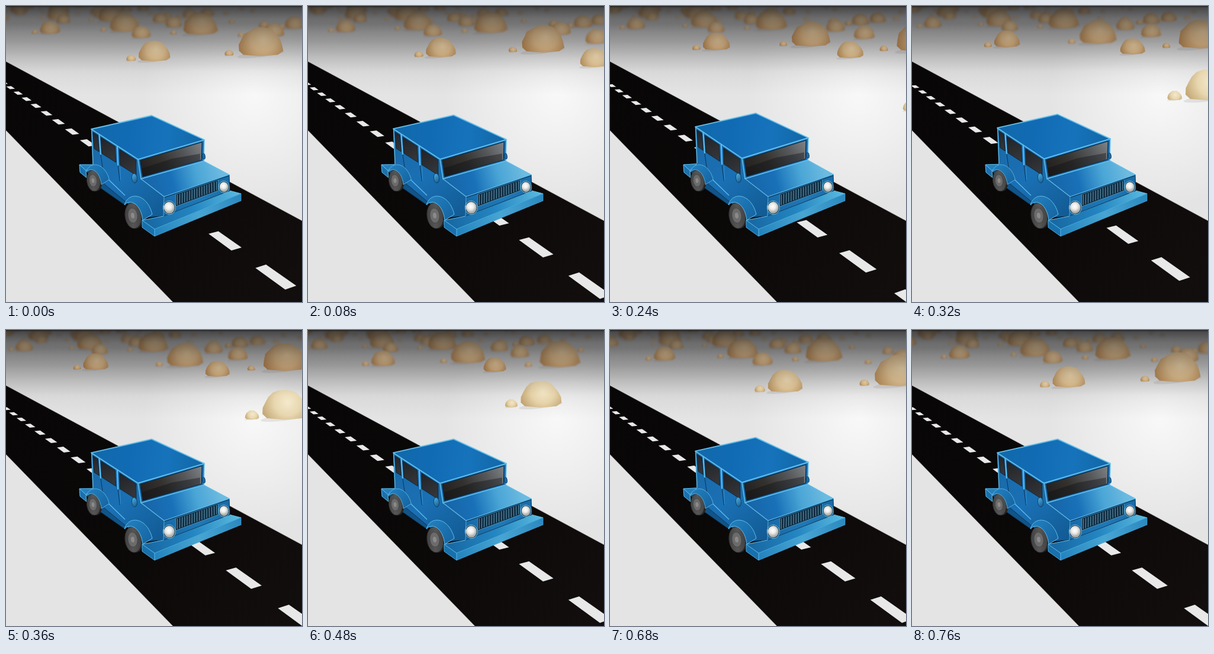
These frames come from a looping animation (500 px wide and 500 px high, 0.8 s). An HTML page with a canvas:

```html
<!DOCTYPE html>
<html lang="en">
<head>
<meta charset="utf-8">
<title>Desert drive</title>
<style>
html, body { margin: 0; width: 100%; height: 100%; overflow: hidden; background: #e4e4e4; }
canvas { display: block; width: 500px; height: 500px; }
</style>
</head>
<body>
<canvas id="stage" width="500" height="500"></canvas>
<script>
const ctx = document.getElementById('stage').getContext('2d');
const STEP = 40, STEPS = 20;
const VANISH = { x: -236, y: -36 };
const ROCK_PERIOD = 0.00448;
const DASH_GAP = 0.0002862;
const BLUE = '#176cb0', EDGE = '#62bfeb', DARK = '#0a365c';
const clamp = v => Math.min(1, Math.max(0, v));

function random(seed) {
  return () => {
    seed = (seed * 16807) % 2147483647;
    return seed / 2147483647;
  };
}

// Ground point: p = lateral position, q = distance (inverse screen height).
const ground = (p, q) => [VANISH.x + p / q, VANISH.y + 1 / q];

// Bilinear surface over four corners, clockwise from the top left.
const surface = (a, b, c, d) => (u, v) => [0, 1].map(k =>
  (a[k] * (1 - u) + b[k] * u) * (1 - v) + (d[k] * (1 - u) + c[k] * u) * v);
const patch = (s, u0, u1, v0, v1) => [s(u0, v0), s(u1, v0), s(u1, v1), s(u0, v1)];

function paint(fill, stroke, width = 1) {
  if (fill) { ctx.fillStyle = fill; ctx.fill(); }
  if (stroke) { ctx.strokeStyle = stroke; ctx.lineWidth = width; ctx.stroke(); }
}

function line(points, color, width) {
  ctx.beginPath();
  points.forEach(point => ctx.lineTo(...point));
  paint(null, color, width);
}

function poly(points, fill, stroke, width) {
  ctx.beginPath();
  points.forEach(point => ctx.lineTo(...point));
  ctx.closePath();
  paint(fill, stroke, width);
}

function oval(x, y, rx, ry, fill, stroke, width) {
  ctx.beginPath();
  ctx.ellipse(x, y, rx, ry, -0.12, 0, Math.PI * 2);
  paint(fill, stroke, width);
}

function addStops(gradient, colors) {
  colors.forEach((c, i) => gradient.addColorStop(i / (colors.length - 1), c));
  return gradient;
}
const linear = ([x0, y0], [x1, y1], ...colors) =>
  addStops(ctx.createLinearGradient(x0, y0, x1, y1), colors);
const radial = (x, y, r, ...colors) =>
  addStops(ctx.createRadialGradient(x, y, 0, x, y, r), colors);

function fillAll(style) {
  ctx.fillStyle = style;
  ctx.fillRect(0, 0, 500, 500);
}

// reach = distance from the vanishing point, slope = direction of the track
const makeRock = (reach, slope, size) => ({ p: 1 / slope, q: 1 / (slope * reach), size });

function scatterRocks() {
  const next = random(417);
  const rocks = [];
  const boulders = [
    [666, 0.177, 0.65], [486, 0.261, 0.43], [564, 0.145, 0.73], [688, 0.125, 0.42],
    [464, 0.19, 0.37], [519, 0.135, 0.4], [723, 0.1, 0.46]
  ];
  boulders.forEach(([reach, slope, size], i) => {
    rocks.push(makeRock(reach, slope, size));
    // the first few have a pebble beside them
    if (i < 4) rocks.push(makeRock(reach * 0.92, slope * 1.09, 0.13));
  });
  for (let i = 0; i < 8; i++) {
    rocks.push(makeRock(480 + 250 * next(), 0.06 + 0.05 * next(), 0.15 + 0.3 * next() ** 2));
  }
  return rocks;
}
const rocks = scatterRocks();

function drawRock({ x, y, w, seed }) {
  const h = w * 0.63;
  const jitter = random(seed * 911 + 37);
  const near = clamp((y - 75) / 65);
  const shade = (hue, sat, light) => `hsl(${hue + near * 8} ${sat}% ${light + near * 11}%)`;
  const points = [];
  for (let i = 0; i <= 12; i++) {
    const a = Math.PI * i / 12;
    const r = 0.95 + jitter() * 0.07;
    points.push([x - Math.cos(a) * w / 2 * r, y - h * 0.16 - Math.sin(a) * h * 0.84 * r]);
  }
  points.push([x + w * 0.38, y - h * 0.02], [x, y + h * 0.03], [x - w * 0.38, y - h * 0.02]);
  ctx.filter = `blur(${0.7 + 1.3 * clamp((70 - y) / 50)}px)`;
  oval(x, y - h * 0.04, w * 0.52, h * 0.1, 'rgba(110,95,80,.12)');
  poly(points, radial(x + w * 0.06, y - h * 0.56, w * 0.56,
    shade(36, 64, 77), shade(34, 55, 69), shade(31, 40, 51)));
  ctx.filter = 'none';
}

function drawRocks(step) {
  const visible = [];
  rocks.forEach((rock, i) => {
    for (let n = -3; n < 7; n++) {
      const q = rock.q + ROCK_PERIOD * (n + step / STEPS);
      if (q < 0.004 || q > 0.03) continue;
      const [x, y] = ground(rock.p, q);
      const w = rock.size / q;
      if (x > -w && x < 500 + w) visible.push({ x, y: y + 1.5, w, q, seed: i + 1 });
    }
  });
  visible.sort((a, b) => b.q - a.q).forEach(drawRock);
}

function drawGround() {
  fillAll('#e4e4e4');
  fillAll(radial(420, 150, 190, 'rgba(255,255,255,.75)', 'rgba(255,255,255,0)'));
  fillAll(linear([0, 0], [0, 150], ...[0.05, 0.22, 0.19, 0.1, 0.04, 0].map(a => `rgba(18,18,20,${a})`)));
}

function drawHaze() {
  fillAll(linear([0, 0], [0, 110], ...[0.76, 0.48, 0.3, 0.18, 0.08, 0].map(a => `rgba(18,18,20,${a})`)));
  ctx.fillStyle = 'rgba(20,20,20,.45)';
  ctx.fillRect(0, 0, 500, 2);
}

function drawRoad(step) {
  poly([[-2, 93], [502, 364], [502, 502], [284, 502], [-2, 208]],
    linear([0, 100], [480, 500], '#080606', '#0b0808', '#130e0e'), 'rgba(70,65,65,.5)', 1);
  const phase = (step * 0.4) % 1;
  for (let n = -5; n < 16; n++) {
    const mid = 0.002314 + DASH_GAP * (n + phase);
    const corner = (p, end) => ground(p, mid + end * DASH_GAP * 0.26 + (p - 1.4) / 2200);
    poly([corner(1.374, 1), corner(1.428, 1), corner(1.428, -1), corner(1.374, -1)], '#e8e8e8');
  }
}

function drawWheel(x, y, scale) {
  const disc = (dx, r, fill, stroke) =>
    oval(x + dx, y, 14 * scale * r, 22 * scale * r, fill, stroke);
  disc(3, 1, '#242424');
  disc(0, 1, linear([x - 14, y], [x + 14, y], '#414141', '#565656', '#424242'), '#2b2b2b');
  disc(-1, 0.58, '#6b6b6b', '#454545');
  disc(-1, 0.22, '#8a8a8a');
}

function drawArch(x, y, scale) {
  ctx.save();
  ctx.translate(x, y);
  ctx.scale(scale, scale);
  ctx.beginPath();
  ctx.moveTo(-15, -18);
  ctx.bezierCurveTo(-8, -42, 24, -37, 32, -2);
  ctx.lineTo(16, 8);
  ctx.bezierCurveTo(13, -20, -5, -29, -15, -18);
  paint(linear([-12, -32], [30, 2], '#2380c0', '#1665a2'), EDGE);
  ctx.restore();
}

function drawLamp([x, y], r) {
  oval(x, y, r + 1.5, r + 2.5, '#12364f', '#79c6e9');
  oval(x, y, r, r + 1, radial(x - 1, y - 2, r + 1, '#ffffff', '#ececea', '#a9adab'));
}

function drawCar(step) {
  // The springs lift the cabin while the wheels stay put.
  const beat = (step % 10) / 10;
  const lift = 4 * Math.sin(Math.PI * beat ** 1.3) ** 2;
  const at = (x, y) => [x, y - lift * clamp((300 - y) / 90)];

  const roof = [at(144, 208), at(246, 185), at(335, 226), at(223, 259)];
  const [rearLeft, , frontRight, frontLeft] = roof;
  const cowlLeft = at(228, 292), cowlRight = at(334, 262);
  const noseLeft = at(267, 322), noseRight = at(377, 285);
  const chinLeft = at(266, 355), chinRight = at(378, 312);
  const tail = at(147, 268);

  const side = surface(rearLeft, frontLeft, at(223, 291), at(147, 243));
  const screen = surface(frontLeft, frontRight, cowlRight, cowlLeft);
  const face = surface(noseLeft, noseRight, chinRight, chinLeft);
  const wheels = [[148, 295, 0.82], [215, 354, 1]];

  // rear bumper and sill
  const heel = [124, 268], toe = [135, 278];
  poly([heel, tail, [202, 320], [202, 337], [155, 304], toe], '#125488', DARK);
  poly([heel, tail, toe], '#2580bd', EDGE);
  poly([heel, toe, [136, 290], [125, 281]], '#1c70ad', EDGE);

  // body side, windows and pillars
  poly([rearLeft, frontLeft, cowlLeft, noseLeft, chinLeft, [236, 357], [200, 329], [158, 294], tail],
    linear([145, 220], [260, 350], '#1a69a7', '#1a70b4', '#125c96'), DARK);
  for (const [from, to] of [[0.03, 0.14], [0.2, 0.51], [0.6, 0.96]]) {
    poly(patch(side, from, to, 0.1, 0.9),
      linear(side(from, 0), side(to, 1), '#1f2126', '#393a3d'), '#0c263a');
  }
  for (const u of [0.17, 0.555]) {
    line([side(u, 0), side(u, 1)], EDGE, 2);
    line([side(u, 1), side(u + 0.03, 1.75)], DARK, 1);
  }
  line([side(0.01, 0), tail], EDGE, 1.4);
  line([side(0.6, 1), side(0.6, 1.7)], '#2f91ce', 1);
  line([[173, 293], [201, 320]], EDGE, 1.2);

  wheels.forEach(wheel => drawWheel(...wheel));
  wheels.forEach(wheel => drawArch(...wheel));

  // front bumper
  const inner = [230, 362], corner = [251, 377], tip = [397, 317];
  const below = ([x, y]) => [x, y + 12];
  poly([inner, chinLeft, chinRight, tip, corner],
    linear(inner, tip, '#1766a1', '#2385c1', '#5bbbe0'), EDGE);
  poly([corner, tip, below(tip), below(corner)],
    linear(corner, tip, '#2484be', '#48a5d2', '#2b88bf'), '#3da4d8', 0.8);
  poly([inner, corner, below(corner), below(inner)], '#1870ac', EDGE, 0.8);

  // grille and lamps
  poly(patch(face, 0, 1, 0, 1), linear(chinLeft, noseRight, '#1665a2', '#1f78b6', '#1a6aa5'), DARK);
  poly(patch(face, 0.18, 0.83, 0.08, 0.74), '#102b40', '#55a7d1', 0.8);
  for (let i = 0; i < 17; i++) {
    const u = 0.205 + i * 0.0375;
    line([face(u, 0.14), face(u, 0.68)], '#55879f', 1.3);
  }
  drawLamp(face(0.085, 0.67), 9);
  drawLamp(face(0.915, 0.64), 7.5);

  // hood
  poly([cowlLeft, cowlRight, noseRight, noseLeft],
    linear([240, 305], [362, 272], '#1766a9', '#1971b8', '#4aa5d6', '#6dbbe0'), EDGE, 1.2);
  line([[267, 323.5], [377, 286.5]], DARK, 1.2);
  line([noseLeft, chinLeft], EDGE, 1);

  // windshield
  poly(patch(screen, 0, 1, 0, 1), BLUE, EDGE, 1.6);
  poly(patch(screen, 0.03, 0.965, 0.08, 0.92),
    linear(screen(0.1, 1), screen(1, 0.1), '#23201f', '#34322f', '#55575a', '#85898c'), '#0b2030');
  poly([screen(0.04, 0.9), screen(0.04, 0.5), screen(0.5, 0.45), screen(0.94, 0.6), screen(0.94, 0.9)],
    'rgba(14,16,20,.4)');

  poly(roof, linear(rearLeft, frontRight, '#1269aa', '#116bb4', '#1673bb', '#1267a6'), EDGE, 1.8);

  // mirrors
  oval(217, 291 - lift * 0.15, 4.5, 8, linear([213, 285], [222, 297], '#48aadc', '#165c91'), DARK, 0.8);
  oval(334, 254 - lift * 0.4, 2.5, 5, '#1c6ba2', DARK, 0.8);
}

function draw() {
  const step = Math.floor(performance.now() / STEP) % STEPS;
  drawGround();
  drawRocks(step);
  drawHaze();
  drawRoad(step);
  drawCar(step);
  requestAnimationFrame(draw);
}
ctx.lineJoin = 'round';
draw();
</script>
</body>
</html>
```
